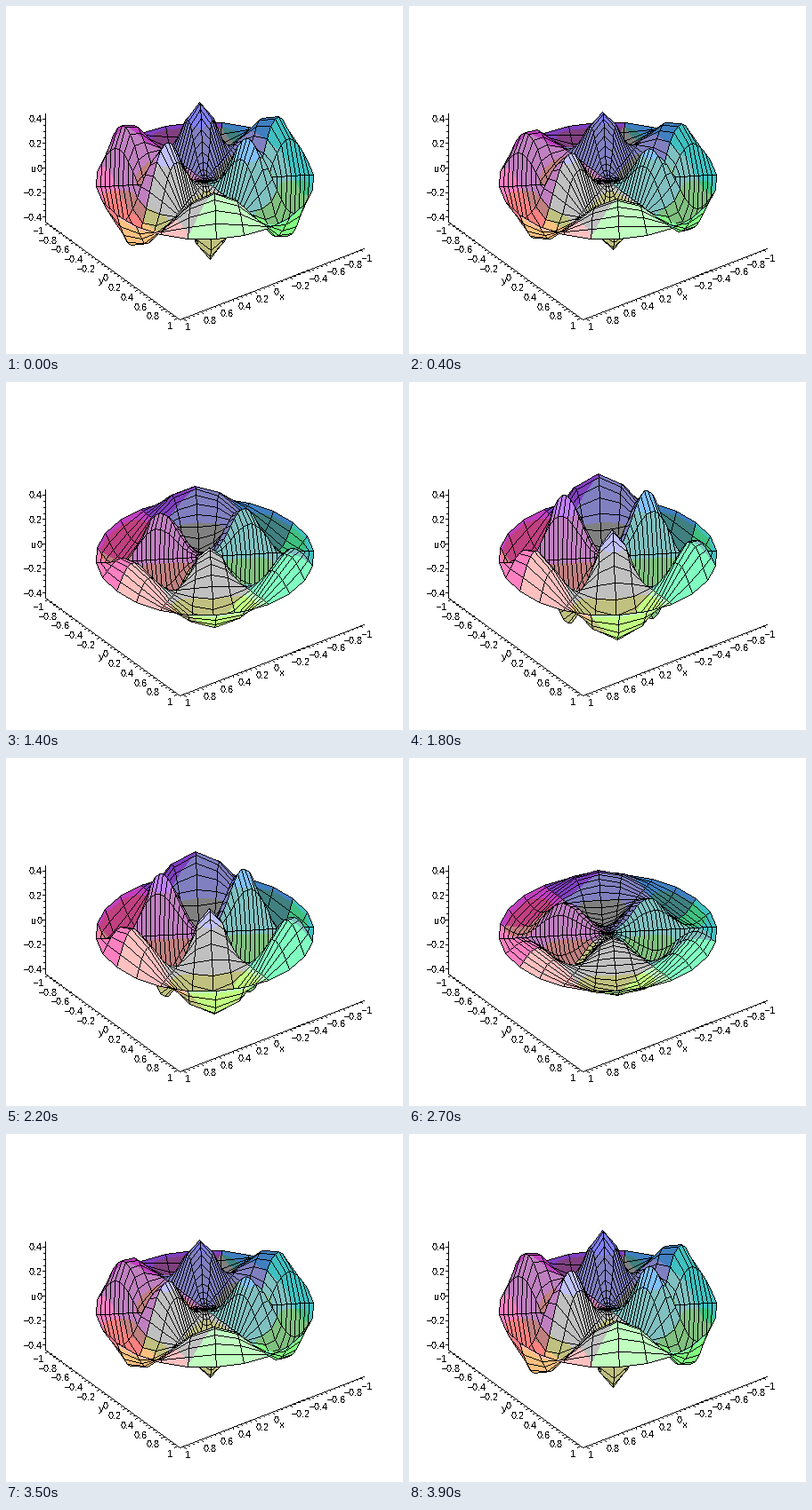
These frames come from a looping animation (446x392 px, 4000 ms). A matplotlib script:

```python
import numpy as np
import matplotlib.pyplot as plt
from matplotlib.animation import FuncAnimation

W, H, DPI = 446, 392, 64
FRAMES, INTERVAL = 40, 100
PX = 72 / DPI                        # one pixel in points

plt.rcParams.update({
    "font.family": "Liberation Sans",
    "text.antialiased": False,
    "text.hinting": "default",
    "text.hinting_factor": 1,
})

# Orthographic view of the unit disc
TURN, TILT = np.radians(54), 0.538
SCALE, Z_UNIT = 122.7, 138
CENTER = np.array([223, 196.5])
X_UNIT = SCALE * np.array([-np.sin(TURN), TILT * np.cos(TURN)])
Y_UNIT = SCALE * np.array([np.cos(TURN), TILT * np.sin(TURN)])

# Membrane mode: three nodal diameters, second radial zero
ORDER, ZERO = 3, 9.76102
CELLS = 24
INK = np.array([0, 0, 0, 255], np.uint8)


def bessel(n, x):
    tau = np.arange(128) * 2 * np.pi / 128
    return np.cos(n * tau - np.multiply.outer(x, np.sin(tau))).mean(axis=-1)


def project(p):
    x, y, z = p[..., 0:1], p[..., 1:2], p[..., 2:3]
    return CENTER + x * X_UNIT + y * Y_UNIT - z * np.array([0, Z_UNIT])


def depth(p):
    flat = p[..., 0] * np.cos(TURN) + p[..., 1] * np.sin(TURN)
    return 0.843 * flat + 0.715 * p[..., 2]


def shade(p):
    """Position as colour: x red, y green, z blue, each in coarse steps."""
    rgba = np.full((len(p), 4), 255)
    rgba[:, :2] = 64 * (1 + np.digitize(p[:, :2], [-0.7, 0, 0.7]))
    rgba[:, 2] = 64 * (2 + np.digitize(p[:, 2], [-0.025, 0.29]))
    return np.minimum(rgba, 255).astype(np.uint8)


def walk(a, b):
    """One-pixel-wide lines from a to b; extra columns are interpolated too."""
    a, b = a.copy(), b.copy()
    for p in (a, b):
        p[..., :2] = np.floor(p[..., :2] + 0.5)
    steps = np.abs(b - a)[..., :2].max(axis=-1)[..., None]
    t = np.minimum(np.arange(steps.max() + 1) / np.maximum(steps, 1), 1)
    pts = a[..., None, :] + (b - a)[..., None, :] * t[..., None]
    pts[..., :2] = np.floor(pts[..., :2] + 0.5)
    return pts


def fill_spans(cell, pts):
    """Fill every cell row by row between its outermost edge points."""
    row = cell * H + pts[:, 1].astype(int)
    order = np.lexsort((pts[:, 0], row))
    change = np.flatnonzero(np.diff(row[order])) + 1
    first = np.concatenate([[0], change])
    last = np.concatenate([change, [len(row)]]) - 1
    left, right = pts[order[first]], pts[order[last]]
    width = (right[:, 0] - left[:, 0]).astype(int) + 1
    span = np.repeat(np.arange(len(width)), width)
    offset = np.arange(len(span)) - (np.cumsum(width) - width)[span]
    t = offset / np.maximum(width - 1, 1)[span]
    inside = left[span] + (right - left)[span] * t[:, None]
    return cell[order[first]][span], inside


radius = np.linspace(0, 1, CELLS + 1)[:, None]
angle = np.linspace(0, 2 * np.pi, CELLS + 1)[None, :]
grid_x = radius * np.cos(angle)
grid_y = radius * np.sin(angle)
mode = bessel(ORDER, ZERO * radius) * np.cos(ORDER * angle)


def surface(amp):
    """Paint the mesh back to front; later pixels cover earlier ones."""
    pts = np.stack([grid_x, grid_y, amp * mode], axis=-1)
    cells = np.stack([pts[:-1, :-1], pts[1:, :-1], pts[1:, 1:], pts[:-1, 1:]],
                     axis=2).reshape(-1, 4, 3)
    cells = cells[np.argsort(depth(cells.mean(axis=1)), kind="stable")]
    corners = np.concatenate([project(cells), cells], axis=-1)

    edges = walk(corners, np.roll(corners, -1, axis=1))
    edge_cell = np.repeat(np.arange(len(cells)), 4 * edges.shape[2])
    edges = edges.reshape(-1, 5)
    fill_cell, inside = fill_spans(edge_cell, edges)

    rank = np.concatenate([2 * fill_cell, 2 * edge_cell + 1])
    order = np.argsort(rank, kind="stable")
    xy = np.concatenate([inside, edges])[order, :2].astype(int)
    colors = np.concatenate([shade(inside[:, 2:]),
                             np.tile(INK, (len(edges), 1))])[order]
    image = np.zeros((H, W, 4), np.uint8)
    image[xy[:, 1], xy[:, 0]] = colors
    return image


fig = plt.figure(figsize=(W / DPI, H / DPI), dpi=DPI, facecolor="white")
ax = fig.add_axes([0, 0, 1, 1])
ax.axis("off")


def show(image, zorder):
    return ax.imshow(image, extent=(0, W, H, 0), aspect="auto",
                     interpolation="nearest", zorder=zorder)


def label(x, y, text, ha):
    ax.text(x, y + 4, text, ha=ha, va="baseline", fontsize=11 * PX)


def number(v):
    return f"{v:g}".replace("-", "\u2212")


def draw_axis(mid, unit, limit, tick, shift, ha):
    """Ticks every 0.05, numbers every 0.2."""
    segs = []
    count = round(limit / 0.05)
    for i in range(-count, count + 1):
        p = mid + unit * i * 0.05
        major = i % 4 == 0
        segs.append([p, p + np.array(tick) * (1 if major else 0.6)])
        if major:
            label(*(p + shift), number(round(i * 0.05, 1)), ha)
    return segs


z_top, corner_l = np.array([44.0, 121]), np.array([44.0, 243])
corner_f, corner_r = np.array([195.0, 353]), np.array([402.0, 273])

lines = [[z_top, corner_l], [corner_l, corner_f], [corner_f, corner_r]]
lines += draw_axis((z_top + corner_l) / 2, np.array([0, -Z_UNIT]), 0.4,
                   (-3, 0), (-3, 0.5), "right")
lines += draw_axis((corner_l + corner_f) / 2, Y_UNIT, 1,
                   (-3, 1.2), (-4.5, 8.5), "right")
lines += draw_axis((corner_f + corner_r) / 2, X_UNIT, 1,
                   (2.4, 1.8), (2, 9.5), "left")
lines = np.array(lines)
trace = walk(lines[:, 0], lines[:, 1]).reshape(-1, 2).astype(int)
frame = np.zeros((H, W, 4), np.uint8)
frame[trace[:, 1], trace[:, 0]] = INK
show(frame, 1)
label(31, 183, "u", "center")
label(107, 309, "y", "center")
label(310, 327, "x", "center")

mesh = show(surface(1), 2)


def update(i):
    # first and last steps share the same phase
    mesh.set_data(surface(np.cos(2 * np.pi * i / (FRAMES - 1))))
    return [mesh]


anim = FuncAnimation(fig, update, frames=FRAMES, interval=INTERVAL,
                     repeat=True, repeat_delay=0, blit=False)
plt.show()
```
